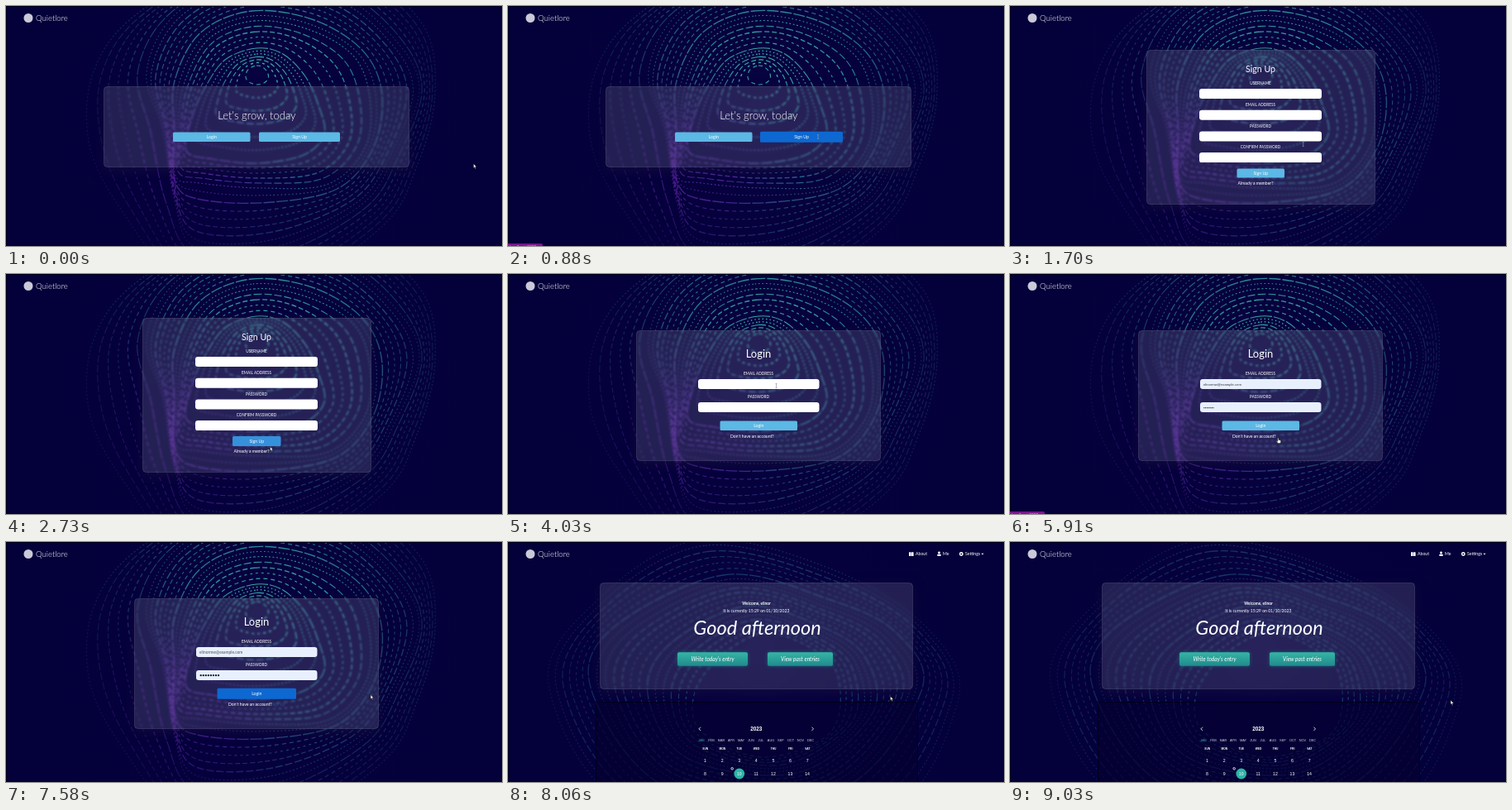
These frames come from a looping animation (600x290 px, 9060 ms). An HTML page with a canvas:

```html
<!DOCTYPE html>
<html lang="en">
<head>
<meta charset="utf-8">
<title>Journal app</title>
<style>
html, body { margin: 0; width: 100%; height: 100%; overflow: hidden; background: #04003a; }
canvas { display: block; width: 600px; height: 290px; }
</style>
</head>
<body>
<canvas id="stage" width="600" height="290"></canvas>
<script>
const W = 600, H = 290, LOOP = 9060;
const ctx = document.getElementById('stage').getContext('2d');
const LATO = 'Lato, sans-serif', SANS = '"Liberation Sans", Arial, sans-serif';
const SKY = [92, 184, 228], BLUE = [13, 104, 210];

function layer() {
  const c = document.createElement('canvas');
  c.width = W;
  c.height = H;
  return c;
}

// ---- dashed contour artwork ----

// Closed smooth curve through a flat list of x, y pairs
function trace(g, p) {
  const n = p.length / 2;
  const at = i => [p[(i + n) % n * 2], p[(i + n) % n * 2 + 1]];
  g.beginPath();
  g.moveTo(...at(0));
  for (let i = 0; i < n; i++) {
    const [a, b, c, d] = [at(i - 1), at(i), at(i + 1), at(i + 2)];
    g.bezierCurveTo(
      b[0] + (c[0] - a[0]) / 6, b[1] + (c[1] - a[1]) / 6,
      c[0] - (d[0] - b[0]) / 6, c[1] - (d[1] - b[1]) / 6, c[0], c[1]);
  }
  g.closePath();
}

const DASHES = [[5, 4], [1.5, 3], [9, 3], [3, 4], [14, 2], [2, 2.5], [6, 3]];

// Rings blended between neighbouring outlines
function rings(g, shapes, steps) {
  let k = 0;
  g.strokeStyle = '#fff';
  for (let s = 0; s < shapes.length - 1; s++) {
    for (let j = 0; j < steps[s]; j++, k++) {
      const f = j / steps[s];
      trace(g, shapes[s].map((v, i) => v + (shapes[s + 1][i] - v) * f));
      g.setLineDash(DASHES[k * 3 % 7]);
      g.lineWidth = k % 4 === 1 ? 1.4 : 1.1;
      g.stroke();
    }
  }
}

function radial(g, x, y, r, stops) {
  const grad = g.createRadialGradient(x, y, 0, x, y, r);
  stops.forEach(([at, color]) => grad.addColorStop(at, color));
  g.fillStyle = grad;
  g.fillRect(0, 0, W, H);
}

function backdrop(shapes, steps, paint) {
  const lines = layer(), g = lines.getContext('2d');
  rings(g, shapes, steps);
  paint(g);
  const out = layer(), o = out.getContext('2d');
  o.fillStyle = '#04003a';
  o.fillRect(0, 0, W, H);
  radial(o, 305, 130, 300, [[0, 'rgba(16,8,78,.45)'], [1, 'rgba(4,0,58,0)']]);
  o.drawImage(lines, 0, 0);
  o.fillStyle = '#010018';
  o.fillRect(0, 0, W, 1);
  o.fillRect(0, 0, 1, H);
  return out;
}

const loopArt = backdrop([
  [303, 72, 309, 73, 314, 77, 317, 82, 317, 88, 312, 93, 304, 95, 296, 93, 291, 89, 290, 84, 292, 78, 297, 74],
  [303, 51, 335, 58, 362, 85, 378, 120, 385, 155, 360, 180, 305, 190, 250, 185, 218, 175, 225, 135, 240, 100, 265, 65],
  [300, 18, 365, 28, 420, 60, 440, 110, 435, 170, 390, 215, 310, 220, 235, 214, 205, 205, 208, 150, 215, 95, 245, 40],
  [290, -30, 400, -15, 470, 40, 500, 100, 470, 180, 430, 240, 330, 290, 230, 292, 204, 235, 190, 150, 170, 80, 205, 10],
  [280, -60, 430, -40, 510, 20, 522, 110, 500, 200, 460, 270, 340, 350, 220, 350, 130, 250, 86, 170, 95, 80, 150, 10]
], [6, 5, 8, 7], g => {
  g.globalCompositeOperation = 'source-atop';
  radial(g, 320, 70, 260, [[0, '#4ad6c0'], [.35, '#35aeb0'], [.7, '#316f9c'], [1, '#2b3f86']]);
  radial(g, 205, 210, 150, [[0, '#8130d0'], [.45, 'rgba(104,44,186,.9)'], [1, 'rgba(70,50,150,0)']]);
  g.globalCompositeOperation = 'destination-in';
  radial(g, 315, 120, 245, [[0, 'rgba(0,0,0,.9)'], [.45, 'rgba(0,0,0,.75)'], [.7, 'rgba(0,0,0,.42)'], [1, 'rgba(0,0,0,.08)']]);
});

const homeArt = backdrop([
  [310, 110, 370, 130, 400, 165, 390, 230, 310, 260, 235, 230, 225, 185, 255, 140],
  [260, 40, 390, 70, 470, 110, 500, 180, 400, 300, 200, 300, 105, 190, 120, 110],
  [230, -10, 400, 30, 520, 110, 550, 200, 450, 340, 150, 330, 40, 170, 110, 60]
], [13, 7], g => {
  g.globalCompositeOperation = 'source-atop';
  radial(g, 300, 200, 300, [[0, '#2f9fa8'], [.5, '#286f98'], [1, '#2a3f88']]);
  g.globalCompositeOperation = 'destination-in';
  radial(g, 300, 170, 280, [[0, 'rgba(0,0,0,.6)'], [.6, 'rgba(0,0,0,.5)'], [1, 'rgba(0,0,0,.2)']]);
});

// ---- drawing helpers ----

function box(x, y, w, h, r, fill) {
  ctx.beginPath();
  ctx.roundRect(x, y, w, h, r);
  if (fill) {
    ctx.fillStyle = fill;
    ctx.fill();
  }
}

function dot(x, y, r, fill) {
  ctx.beginPath();
  ctx.arc(x, y, r, 0, 7);
  ctx.fillStyle = fill;
  ctx.fill();
}

function text(s, x, y, size, o = {}) {
  ctx.font = `${o.style || 'normal'} ${o.weight || 400} ${size}px ${o.face || LATO}`;
  ctx.textAlign = o.align || 'center';
  ctx.textBaseline = 'alphabetic';
  ctx.fillStyle = o.color || '#fff';
  ctx.fillText(s, x, y + size * .36);
}

const mix = (f, a = SKY, b = BLUE) => `rgb(${a.map((v, i) => Math.round(v + (b[i] - v) * f))})`;

// Frosted panel: blurred artwork under a pale tint
function glass(art, x, y, w, h) {
  ctx.save();
  ctx.shadowColor = 'rgba(20,16,60,.7)';
  ctx.shadowBlur = 14;
  ctx.shadowOffsetY = 4;
  box(x, y, w, h, 4, '#0a0640');
  ctx.restore();
  ctx.save();
  box(x, y, w, h, 4);
  ctx.clip();
  ctx.filter = 'blur(1.3px)';
  ctx.drawImage(art, 0, 0);
  ctx.restore();
  box(x + .5, y + .5, w - 1, h - 1, 4, 'rgba(255,255,255,.12)');
  ctx.strokeStyle = 'rgba(255,255,255,.13)';
  ctx.lineWidth = 1;
  ctx.stroke();
}

function button(label, x, y, w, h, hover = 0) {
  box(x - hover, y - hover * .8, w + 2 * hover, h + 1.6 * hover, 1.5, mix(hover));
  text(label, x + w / 2, y + h / 2, 5.2);
}

function field(label, x, y, w, fill = '#fff') {
  text(label, 303, y - 6.5, 4.7);
  box(x, y, w, 12, 3.2, fill);
}

function header() {
  dot(27, 14.5, 5.5, '#c9c9d8');
  text('Quietlore', 36, 14.5, 9.6, { weight: 300, align: 'left' });
}

// Fades in after a, out after b
function pulse(t, a, b, d = 150) {
  const clamp = v => Math.max(0, Math.min(1, v));
  return clamp((t - a) / d) * (1 - clamp((t - b) / d));
}

// ---- pages ----

function landing(t) {
  ctx.drawImage(loopArt, 0, 0);
  glass(loopArt, 118, 97, 370, 98);
  text("Let's grow, today", 303.5, 132.5, 13, { weight: 300 });
  button('Login', 202, 152.5, 93.5, 11.5);
  button('Sign Up', 306, 152.5, 98, 11.5, pulse(t, 640, 2000));
}

function signUp(t) {
  ctx.drawImage(loopArt, 0, 0);
  glass(loopArt, 165, 53, 277, 187);
  text('Sign Up', 303, 76, 10.6);
  ['USERNAME', 'EMAIL ADDRESS', 'PASSWORD', 'CONFIRM PASSWORD']
    .forEach((s, i) => field(s, 229, 100 + i * 25.7, 148));
  button('Sign Up', 274.5, 196.5, 57.5, 11, pulse(t, 2300, 2655));
  text('Already a member?', 275.5, 214, 5.1, { align: 'left' });
  text('Login', 319, 214, 5.1, { align: 'left', color: '#2c4380' });
}

function login(t) {
  const preview = t >= 5250, filled = t >= 6350;
  const fill = preview ? '#e8f0fe' : '#fff';
  ctx.drawImage(loopArt, 0, 0);
  glass(loopArt, 155, 68, 296, 158);
  text('Login', 303, 96, 13);
  field('EMAIL ADDRESS', 230, 127, 146.5, fill);
  field('PASSWORD', 230, 155, 146.5, fill);
  if (preview) {
    text('elinormw@example.com', 234, 133, filled ? 4.9 : 4.2,
      { align: 'left', face: filled ? LATO : SANS, color: filled ? '#4c5060' : '#30323a' });
    for (let i = 0; i < 8; i++) {
      if (filled) dot(235.7 + i * 3.05, 161.2, 1.15, '#15151c');
      else dot(234.8 + i * 1.6, 161.7, .6, '#30323a');
    }
  }
  button('Login', 256.5, 177.5, 93.5, 11.5, pulse(t, 6750, 9000));
  text("Don't have an account?", 269, 196.3, 5.15, { align: 'left' });
  text('Sign up', 321, 196.3, 5.1, { align: 'left', color: t > 5700 && t < 6450 ? '#1b2454' : '#2f4a85' });
}

function nav() {
  const left = { align: 'left' };
  box(485, 12.3, 2.6, 4.6, .5, '#fff');
  box(488, 12.3, 2.6, 4.6, .5, '#fff');
  text('About', 493, 14.5, 5.2, left);
  dot(521.5, 13, 1.4, '#fff');
  box(519.2, 14.8, 4.6, 2.2, 1, '#fff');
  text('Me', 526, 14.5, 5.2, left);
  ctx.beginPath();
  ctx.arc(548.3, 14.5, 1.7, 0, 7);
  ctx.strokeStyle = '#fff';
  ctx.lineWidth = 1.5;
  ctx.stroke();
  text('Settings', 553, 14.5, 5.2, left);
  poly([572.5, 13.8, 575.5, 13.8, 574, 15.5], '#fff');
}

function calendar() {
  box(106.5, 193.5, 389, 110, 3, 'rgba(5,1,50,.72)');
  ctx.strokeStyle = 'rgba(2,0,22,.9)';
  ctx.lineWidth = 1;
  ctx.stroke();
  const bold = { face: SANS, weight: 700 };
  text('2023', 300.3, 226, 6.4, bold);
  ctx.strokeStyle = '#fff';
  ctx.lineWidth = .8;
  for (const [x, d] of [[232, 1], [368.5, -1]]) {
    ctx.beginPath();
    ctx.moveTo(x + d, 223.7);
    ctx.lineTo(x - d, 225.8);
    ctx.lineTo(x + d, 227.9);
    ctx.stroke();
  }
  'JAN FEB MAR APR MAY JUN JUL AUG SEP OCT NOV DEC'.split(' ').forEach((m, i) =>
    text(m, 234 + i * 12, 240, 3.9, { face: SANS, color: i ? '#d4d4e2' : '#36b5b0' }));
  'SUN MON TUE WED THU FRI SAT'.split(' ').forEach((d, i) =>
    text(d, 238.7 + i * 20.6, 250, 3.3, bold));
  dot(279.8, 280, 6.4, '#2bb5a6');
  for (let i = 0; i < 14; i++)
    text(i + 1, 238.5 + i % 7 * 20.6, i < 7 ? 264 : 280, 5.2, { face: SANS });
  ctx.beginPath();
  ctx.arc(271.2, 273.8, 1.3, 0, 7);
  ctx.lineWidth = .8;
  ctx.stroke();
}

function action(label, x, w) {
  ctx.save();
  ctx.shadowColor = 'rgba(20,110,120,.8)';
  ctx.shadowBlur = 4;
  const g = ctx.createLinearGradient(0, 133, 0, 150);
  g.addColorStop(0, '#36b5a6');
  g.addColorStop(1, '#208a8c');
  box(x, 133.3, w, 16.5, 2, g);
  ctx.restore();
  text(label, x + w / 2, 141.3, 6.6, { style: 'italic' });
}

function home() {
  ctx.drawImage(homeArt, 0, 0);
  nav();
  glass(homeArt, 111, 49, 379, 129);
  text('Welcome, elinor', 300.5, 74, 4.8, { weight: 700 });
  text('It is currently 15:29 on 01/10/2023', 300.3, 83.3, 5.1);
  text('Good afternoon', 301.5, 103.5, 23.6, { style: 'italic' });
  action("Write today's entry", 205, 85);
  action('View past entries', 314, 79);
  calendar();
}

// ---- pointer and link hint ----

function poly(p, fill, line) {
  ctx.beginPath();
  for (let i = 0; i < p.length; i += 2) ctx.lineTo(p[i], p[i + 1]);
  ctx.closePath();
  ctx.fillStyle = fill;
  ctx.fill();
  if (line) {
    ctx.strokeStyle = line;
    ctx.lineWidth = .5;
    ctx.stroke();
  }
}

const cursors = {
  arrow: () => poly([0, 0, 0, 5.4, 1.2, 4.3, 2.1, 6.3, 3, 5.9, 2.1, 4, 3.8, 4], '#fff', '#000'),
  hand: () => poly([-.6, 0, .4, 0, .5, 2.4, 3, 3, 3.1, 5, 2.4, 6.6, -.4, 6.6, -2.2, 4.2, -1.6, 3.6, -.6, 4.4], '#fff', '#222'),
  beam() {
    ctx.fillStyle = '#8d96a8';
    ctx.fillRect(-.3, -2.8, .7, 5.6);
    ctx.fillRect(-1, -3, 2, .6);
    ctx.fillRect(-1, 2.4, 2, .6);
  }
};

// time, x, y, shape from that time on
const path = [
  [0, 565.5, 190.5, 'arrow'], [100, 565.5, 190.5, 'arrow'], [660, 398, 162, 'beam'], [850, 375, 158, 'beam'],
  [1350, 374, 158, 'beam'], [1800, 352, 168, 'arrow'], [2300, 318, 197, 'hand'], [2640, 319, 206, 'arrow'],
  [2730, 319.5, 208.5, 'arrow'], [2850, 324, 212, 'hand'], [3200, 324, 212, 'arrow'], [3450, 324, 190, 'arrow'],
  [3850, 324.5, 138, 'beam'], [4030, 324.5, 135, 'beam'], [4750, 316, 133, 'beam'], [5250, 318, 150, 'arrow'],
  [5750, 324.5, 196, 'hand'], [5910, 324.5, 198, 'hand'], [6350, 324.5, 198, 'arrow'], [6750, 312, 184, 'hand'],
  [7340, 312, 184, 'hand'], [7400, 350, 185, 'arrow'], [7580, 441, 184.5, 'arrow'], [7950, 458, 186, 'arrow'],
  [8700, 533, 191, 'arrow'], [LOOP, 533, 191, 'arrow']
];

function pointer(t) {
  const i = path.findIndex(p => p[0] > t) - 1;
  const a = path[i], b = path[i + 1];
  const f = (t - a[0]) / (b[0] - a[0]), e = f * f * (3 - 2 * f);
  ctx.save();
  ctx.translate(a[1] + (b[1] - a[1]) * e, a[2] + (b[2] - a[2]) * e);
  cursors[a[3]]();
  ctx.restore();
}

function hint(t) {
  const shown = [[760, 960], [2880, 3300], [5780, 6420]].some(([a, b]) => t >= a && t < b);
  if (!shown) return;
  box(0, 287, 42, 5, [0, 2, 0, 0], '#7d1592');
  text('localhost:3000', 2, 290.8, 5, { align: 'left', face: SANS, color: '#e9c8f0' });
}

function draw(t) {
  const page = t < 905 ? landing : t < 3200 ? signUp : t < 7950 ? login : home;
  page(t);
  header();
  hint(t);
  pointer(t);
}

const start = performance.now();
function tick() {
  draw((performance.now() - start) % LOOP);
  requestAnimationFrame(tick);
}
tick();
</script>
</body>
</html>
```
